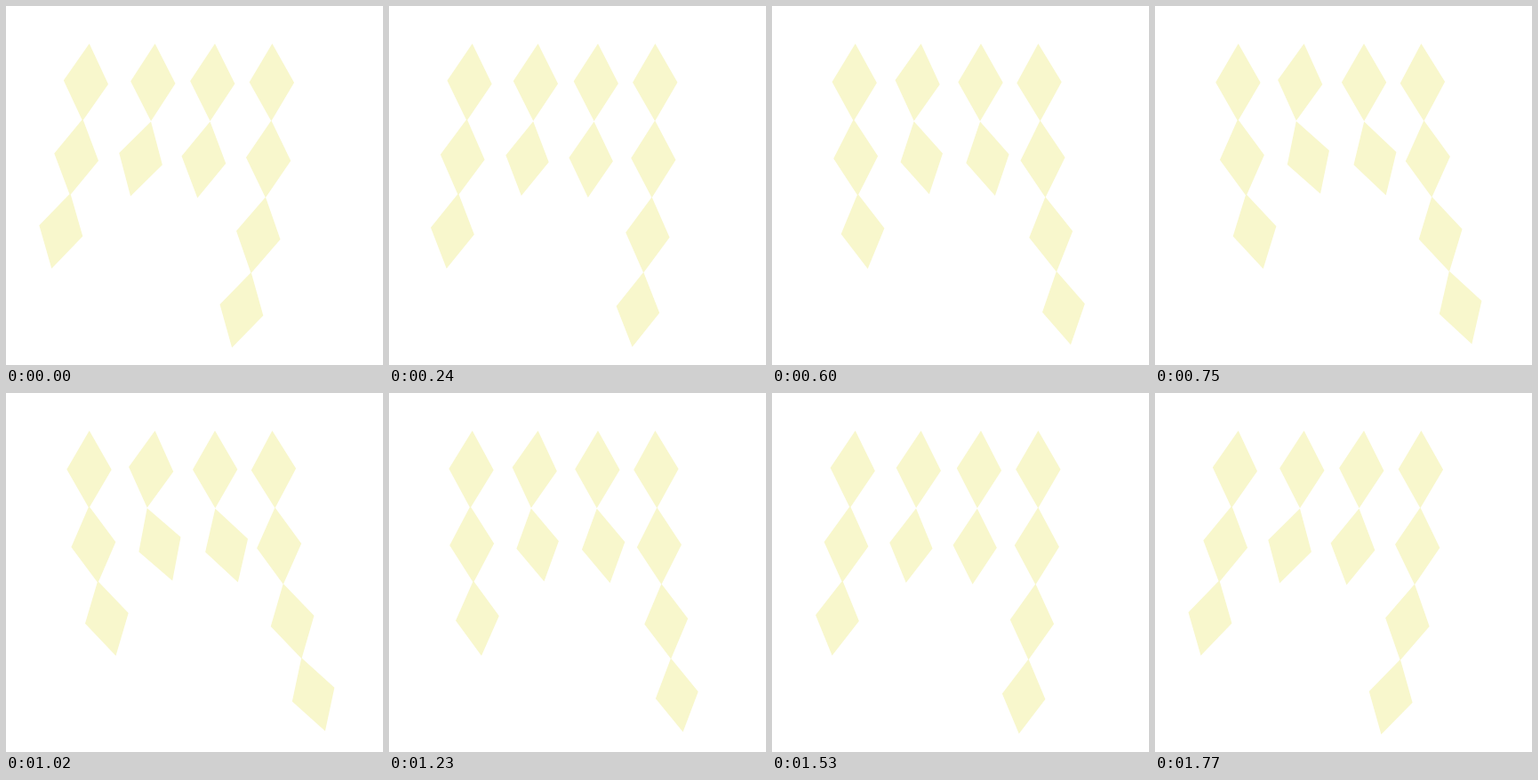
These frames come from a looping animation (424 by 403 pixels, 1800 ms). An HTML page:

```html
<!DOCTYPE html>
<html lang="en">
<head>
<meta charset="utf-8">
<title>Swaying diamonds</title>
<style>
  html, body { margin: 0; width: 100%; height: 100%; overflow: hidden; background: #fff; }
  svg { display: block; }
</style>
</head>
<body>
<svg width="424" height="403" viewBox="0 0 424 403"><path id="garlands" fill="#f8f7cc"/></svg>
<script>
const LOOP = 1800;
const TOP = 42.3;
const HEIGHT = 87;
const HALF_WIDTH = 25.2;

// left and right hold the tilt in degrees of the first and last diamond at each end of the swing.
const chains = [
  { x: 93.7, count: 3, pitch: 84.7, left: [5, 14], right: [0, -15] },
  { x: 167.6, count: 2, pitch: 87.5, left: [3, 15.3], right: [6, -21] },
  { x: 235, count: 2, pitch: 87.5, left: [3.6, 9.4], right: [-0.4, -18.5] },
  { x: 299.4, count: 4, pitch: 86.2, left: [0.7, 14.4], right: [-2.2, -19.6] }
];

const path = document.getElementById("garlands");
const mix = (a, b, k) => a + (b - a) * k;
const ease = p => p * p * (3 - 2 * p);

function diamond(x, y, sin, cos) {
  const at = (u, v) => [x + u * cos - v * sin, y + u * sin + v * cos];
  const middle = HEIGHT / 2;
  return [at(0, 0), at(HALF_WIDTH, middle), at(0, HEIGHT), at(-HALF_WIDTH, middle)];
}

// Diamonds hang one below the other, the tilt easing from the first to the last.
function pose(side) {
  return chains.flatMap(({ x, count, pitch, [side]: [first, last] }) => {
    let y = TOP;
    return Array.from({ length: count }, (_, i) => {
      const tilt = mix(first, last, ease(i / (count - 1))) * Math.PI / 180;
      const sin = Math.sin(tilt), cos = Math.cos(tilt);
      const shape = diamond(x, y, sin, cos);
      x -= pitch * sin;
      y += pitch * cos;
      return shape;
    });
  });
}

const left = pose("left");
const right = pose("right");

// Corners travel in straight lines between the two poses.
function draw(time) {
  const k = ease(1 - Math.abs(1 - 2 * (time % LOOP) / LOOP));
  path.setAttribute("d", left.map((shape, i) =>
    "M" + shape.map((corner, j) =>
      corner.map((v, axis) => mix(v, right[i][j][axis], k).toFixed(2)).join(" ")
    ).join("L") + "Z"
  ).join(""));
}

const start = performance.now();
function tick() {
  draw(performance.now() - start);
  requestAnimationFrame(tick);
}
tick();
</script>
</body>
</html>
```
